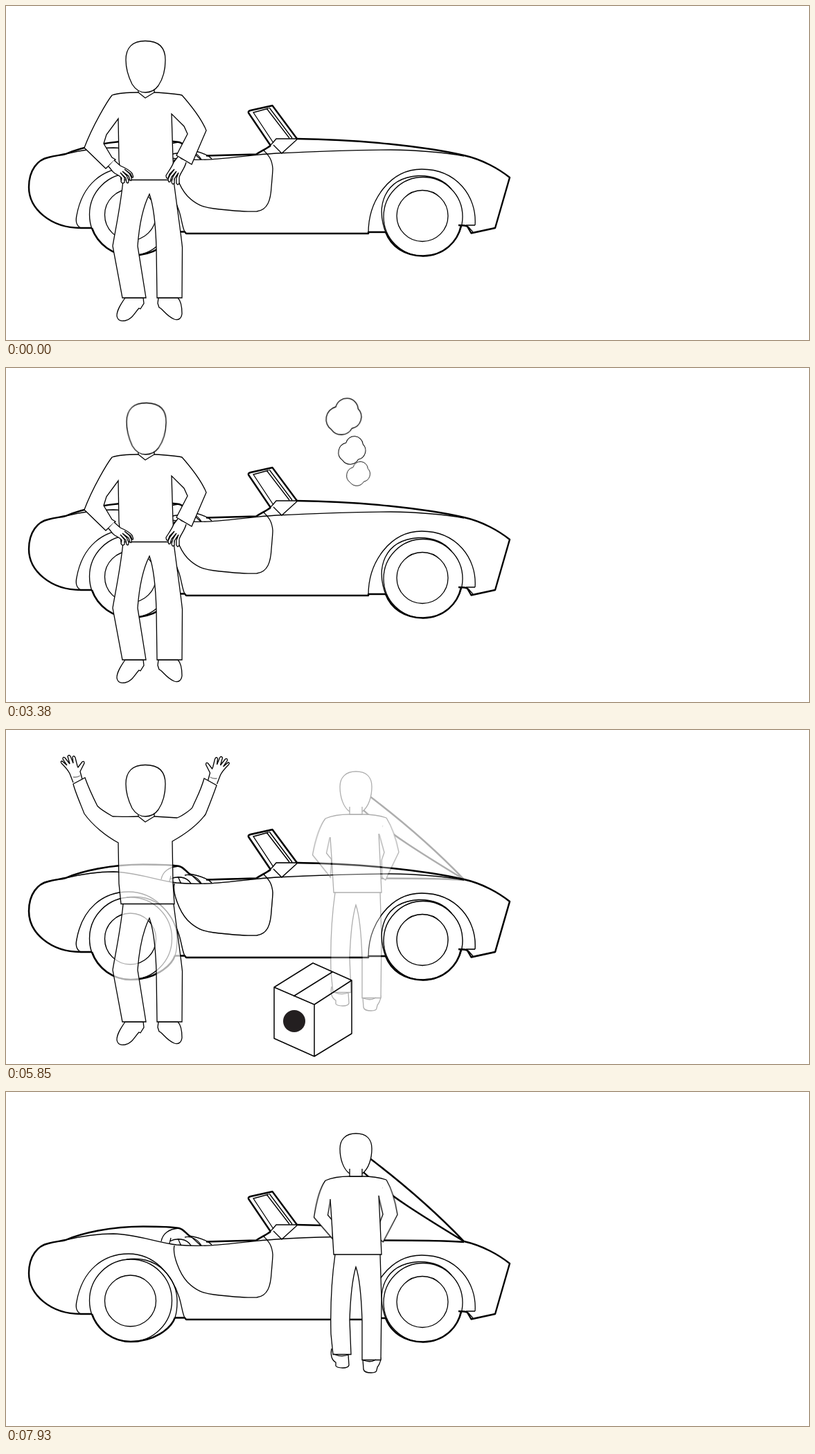
Animation, 1159 px wide and 483 px high, one loop 8000 ms. Source, as an HTML page:

```html
<!DOCTYPE html>
<html lang="en">
<head>
<meta charset="utf-8">
<title>Roadside stop</title>
<style>
html, body { margin: 0; width: 100%; height: 100%; overflow: hidden; background: #fff; }
svg { display: block; width: 100%; height: 100%; }
path, circle { fill: none; stroke: #000; stroke-width: 1.3; }
.bold { stroke-width: 2.4; stroke-linejoin: round; }
.solid { fill: #fff; }
.blank { fill: #fff; stroke: none; }
.emblem { fill: #231f20; stroke: none; }
.box path { stroke-width: 1.5; stroke-linejoin: round; }
.puff { stroke-width: .72; }

.anim { animation: 8s linear infinite; }
.hips { animation-name: hips; }
.cheer { animation-name: cheer; }
.repair { animation-name: repair; }
.smoke { animation-name: smoke; }
.box { animation-name: box; transform-origin: 443px 404.5px; }
.head { animation-name: nod; transform-origin: 201px 125px; }
.puff1 { animation-name: puff1; }
.puff2 { animation-name: puff2; }
.puff3 { animation-name: puff3; }
.arm { animation-name: work; animation-timing-function: ease-in-out; }
.arm.left { --swing: 1.1deg; transform-origin: 461px 128px; }
.arm.right { --swing: -1.1deg; transform-origin: 549px 127px; }

/* Scenes fade in on top of each other, then the lower one is cut. */
@keyframes hips { 0%, 58% { opacity: 1 } 58.01%, 100% { opacity: 0 } }
@keyframes cheer { 0%, 45.5% { opacity: 0 } 58%, 75.75% { opacity: 1 } 75.76%, 100% { opacity: 0 } }
@keyframes repair { 0%, 71.9% { opacity: 0 } 75.75%, 100% { opacity: 1 } }
@keyframes smoke { 0%, 47.4% { opacity: 1 } 59.9%, 100% { opacity: 0 } }
@keyframes box {
  0%, 47.2% { opacity: 0; transform: scale(1.12) }
  60%, 83.75% { opacity: 1; transform: none }
  94.2%, 100% { opacity: 0; transform: none }
}
@keyframes nod {
  0% { transform: rotate(0); animation-timing-function: cubic-bezier(.39,.575,.565,1) }
  11.375% { transform: rotate(-3.3deg); animation-timing-function: cubic-bezier(.445,.05,.55,.95) }
  34.125% { transform: rotate(3.3deg); animation-timing-function: cubic-bezier(.47,0,.745,.715) }
  45.5%, 100% { transform: rotate(0) }
}
@keyframes puff1 {
  0% { opacity: 0; transform: translate(513px,171px) scale(1) }
  10% { opacity: 1 }
  58%, 100% { opacity: 1; transform: translate(478.2px,31.8px) scale(2.15) }
}
@keyframes puff2 {
  0%, 9.75% { opacity: 0; transform: translate(512.5px,171.5px) scale(1.02) }
  19.75% { opacity: 1 }
  58%, 100% { opacity: 1; transform: translate(493.2px,92.9px) scale(1.6) }
}
@keyframes puff3 {
  0%, 19.75% { opacity: 0; transform: translate(512px,171.2px) scale(1.02) }
  29.75% { opacity: 1 }
  58%, 100% { opacity: 1; transform: translate(506.4px,139.4px) scale(1.36) }
}
@keyframes work {
  0%, 73.1% { transform: rotate(var(--swing)) }
  95.9%, 100% { transform: rotate(calc(var(--swing) * -1)) }
}
</style>
</head>
<body>
<svg viewBox="0 0 1159 483">
<defs>
  <g id="car">
    <!-- outline -->
    <path class="bold" d="M124 321H108C64 321 33 293 33 262C33 237 46 222 61 219C71 216 78 216 86 214C110 204 150 194.500 198 194.500C220 194.500 240 195 250 197C257 199 259 204 266 209"/>
    <path class="bold" d="M289 216.500L361 214.500C370 209 376 206 382 202M244 326.500H258L260 329H523V327H548"/>
    <path class="bold" d="M661 216C688 222 712 236 727 248L706 321L671.500 328.500L666 319Q664 317 653 317"/>
    <path d="M664 317H677M667 319L674 327"/>
    <!-- windscreen -->
    <path class="bold" d="M382 202L350 154.500Q349 152 353 151L384.500 144L420 192"/>
    <path d="M386 198L357 154L379 148M376 148L409 191M380 147L413 191M420 192H390L384 199L372 209M420 193L398 213L386 201"/>
    <!-- cockpit -->
    <path d="M224 216C226 205 235 198 249 197M236 216C246 211 260 211 267 222M248 212C251 217 251 220 253 222M238 211L236 219M258 210C266 208 276 212 282 222M264 208C276 210 290 214 297 221M268 210L281 222"/>
    <!-- door -->
    <path d="M243 222C240 235 250 262 262 275C275 288 285 291 300 293C325 296 345 298 362 297C378 295 382 280 383 262C384 250 385 240 385 235C384 222 379 215 371 208"/>
    <!-- rear wheel -->
    <path d="M108 321C102 318 100 312 102 303C110 258 140 234 177 234C215 234 240 265 250 297C254 310 254 318 258 327"/>
    <circle cx="180" cy="301.500" r="59.500"/>
    <circle cx="179.500" cy="302" r="37"/>
    <path d="M174 242C192 239 213 243 228 258C241 271 247 285 247 303C247 312 246 320 244 326"/>
    <path class="bold" d="M124 321A59.500 59.500 0 0 0 180 361C213 361 238 343 244 326"/>
    <!-- front wheel -->
    <path d="M523 328C523 280 555 236 600 236C650 236 680 275 677 317M549 330C533 290 545 249 595 245.500C620 245 635 255 643 265"/>
    <circle cx="602" cy="304.500" r="57"/>
    <circle cx="601" cy="303.500" r="37"/>
    <path class="bold" d="M548 327C556 348 575 361 602 361.500C632 361 652 341 657 317"/>
  </g>
  <g id="closedCar">
    <use href="#car"/>
    <path class="bold" d="M420 192C510 193 605 203 661 216"/>
    <path d="M86 214C115 207 135 205 155 205C190 206 215 217 246 221C300 226 340 216 390 213C450 210 510 208 555 208C595 208 640 213 661 217"/>
  </g>
  <g id="legs">
    <path class="solid" d="M172 422C165 432 160 440 160 448C161 455 166 456 172 455C182 453 186 443 192 437L194 438L199 430L198 422Z"/>
    <path class="solid" d="M248 422C253 427 254 436 254 445C253 452 249 455 243 453C233 449 229 442 223 437L221 436L219 430L220 422Z"/>
    <path class="solid" d="M169 252C166 285 159 318 154 347L168 422H202L190 347C192 320 197 292 207 272C212 286 216 316 217 350L218 422H254L254.500 349C252 325 246 285 242 252"/>
  </g>
  <path id="neck" class="solid" d="M191 121V125L201 133L214 125V121"/>
  <path id="face" class="solid" d="M201 50.500C221 50.500 230 61 230 78C230 92 226 106 220 115C215 122 208 125 201 125C194 125 187 121 182 113C177 103 173 92 173 78C173 60 183 50.500 201 50.500Z"/>
  <g id="openHand">
    <path class="solid" d="M97 76L92 63C90 59 86 54 80 48Q78 45 81 45L88 51L82 42Q82 38 85 40L92 49L89 38Q91 35 93 38L97 48L96 39Q98 36 100 40L103 52L104 54L110 46Q113 44 113 48L107 60L110 71"/>
    <path stroke-opacity=".5" d="M97 68Q103 69 107 66"/>
  </g>
  <path id="cloud" class="puff" d="M-6.300 -7.300A8.900 8.900 0 0 1 11.200 -5.800A9.300 9.300 0 0 1 6.300 9.700A9.500 9.500 0 0 1 -9.700 10.700A10.100 10.100 0 0 1 -6.300 -7.300Z"/>
</defs>

<g class="anim hips">
  <use href="#closedCar"/>
  <use href="#legs"/>
  <path class="solid" d="M191 125C175 125 162 126 153 129C146 138 125 173 113 205L144 235L158 222L153 219L141 199L145 186L162 163L163 222L166 251.500H243L241 222L239 156L257 174L262 185L246 216L268 229L289 180C283 165 268 145 254 129C245 127 235 126 214 125"/>
  <path class="solid" d="M148 232C152 236 153 240 157 242C161 244 165 246 167 249L166 254Q168 258 171 255L171 248L165 241L173 249L174 255Q177 258 177 252L174 245L168 239L177 246L179 252Q182 254 181 248L178 242L171 236L180 243L182 248Q185 249 182 242C178 237 172 234 165 231L156 223"/>
  <path class="solid" d="M260 226C258 235 251 242 250 248L250 256Q248 261 246 256L246 249L249 241L243 250L243 256Q240 260 239 254L241 247L246 239L239 247L237 254Q234 256 234 250L237 244L243 236L236 243L234 249Q231 250 231 245C234 240 240 232 242 226L248 218"/>
  <use href="#neck"/>
  <g class="anim head"><use href="#face"/></g>
  <g class="anim smoke">
    <g class="anim puff1"><use href="#cloud"/></g>
    <g class="anim puff2"><use href="#cloud"/></g>
    <g class="anim puff3"><use href="#cloud"/></g>
  </g>
</g>

<g class="anim cheer">
  <use href="#closedCar"/>
  <use href="#legs"/>
  <use href="#openHand"/>
  <use href="#openHand" transform="translate(401.500 2) scale(-1 1)"/>
  <path class="solid" d="M191 125C175 126 160 125 154 125C147 121 135 113 132 110C124 94 120 86 114 69L97 78C100 90 108 108 113 121C125 138 145 154 162 163L163 222L166 251.500H243L241 222L240 161C258 151 276 138 288 122C292 112 297 100 304 80L286 70C281 88 275 98 269 112C267 115 255 124 247 127L214 125"/>
  <use href="#neck"/>
  <use href="#face"/>
</g>

<g class="anim repair">
  <use href="#car"/>
  <path d="M86 214C115 207 135 205 155 205C190 206 215 217 246 221C300 226 340 216 390 213C420 211 450 210 475 209.500"/>
  <path class="bold" d="M420 192L460 193M520 92C565 126 615 168 661 216M516 116C550 148 602 180 661 216M541 214.500C600 214.500 640 215 661 217"/>
  <path class="solid" d="M470 371C468 380 470 388 476 391L476 396Q478 399 486 399Q494 399 495 395L494 380"/>
  <path class="solid" d="M515 387L516 401Q517 406 527 406Q535 406 535 402L536 398C539 394 541 390 541 384"/>
  <path class="solid" d="M475 235C470 270 468 310 469 350L472 379.500H498L496 330C497 300 500 270 505 253C511 270 513 300 514 330L514 387.500H541L542 300L540 235"/>
  <path d="M473 379Q484 384 494 380M516 388Q526 392 534 387"/>
  <path class="blank" d="M461 128L496 122H514L549 127L538 150L542 235H473L468 155Z"/>
  <g class="anim arm left"><path class="solid" d="M461 128C452 140 447 160 443.500 181L470 213L471 187L463.500 178L468 155"/></g>
  <g class="anim arm right"><path class="solid" d="M549 127C558 142 563 160 566 177L546 217L541 213L541 188L545 177L538 150"/></g>
  <path class="solid" d="M468 155L470 185L473 235H542L540 190L538 150"/>
  <path class="solid" d="M461 128C470 124 482 122 496 122H514C530 122 540 124 549 127"/>
  <path class="solid" d="M496 118C487 112 482 97 482 82C482 69 490 60 505 60C521 60 528 69 528 82C528 95 524 111 514 118"/>
  <path class="solid" d="M496 111V122H514V111"/>
</g>

<g class="anim box">
  <path d="M443 337L499 362V439L445 472L387 446V372ZM387 372L445 397L499 362M445 397V472M415 385L471 350"/>
  <circle class="emblem" cx="416" cy="421" r="16"/>
</g>
</svg>
</body>
</html>
```
